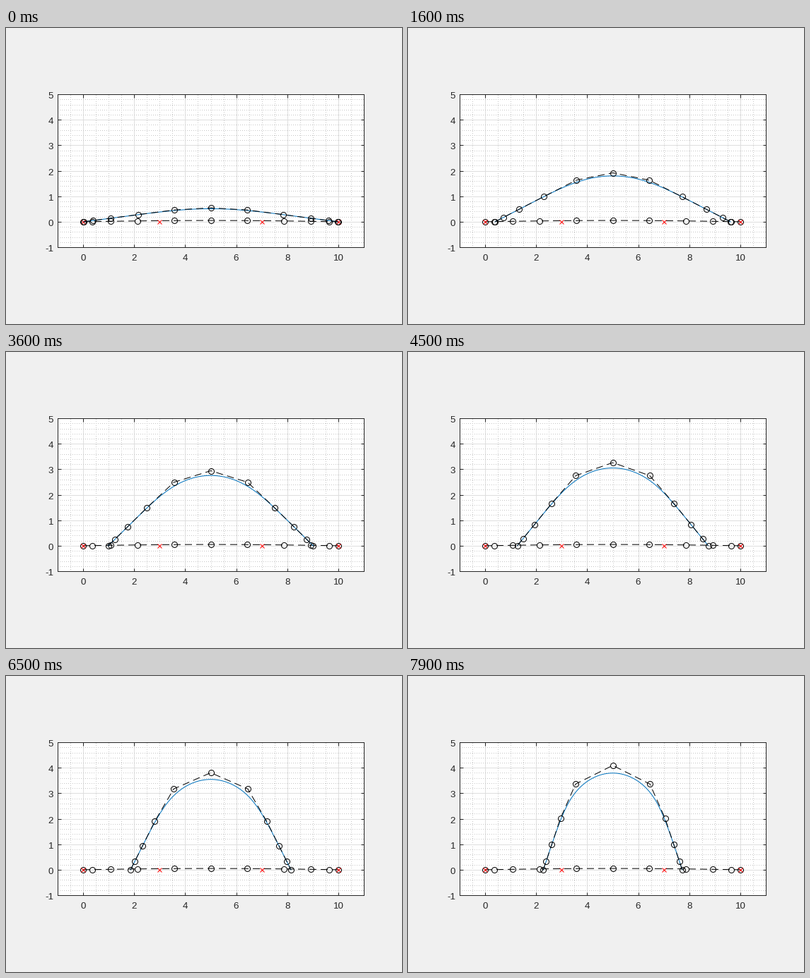
A matplotlib script for the animation above (8 s loop, 560 by 420 pixels).

```python
import numpy as np
import matplotlib.pyplot as plt
from matplotlib.animation import FuncAnimation

W, H, DPI = 560, 420, 100
PX = 72 / DPI  # points per pixel
DEG, SPANS = 4, 7
INK = "#262626"

plt.rcParams["font.family"] = "Liberation Sans"

knots = np.r_[[0] * DEG, np.arange(SPANS + 1), [SPANS] * DEG].astype(float)
rest_x = 10 / SPANS * np.array([knots[i + 1:i + DEG + 1].mean()
                                for i in range(SPANS + DEG)])


def basis(t):
    """B-spline basis values, one column per control point."""
    n = len(knots) - 1
    b = np.array([(knots[i] <= t) & (t < knots[i + 1]) for i in range(n)], float)
    for d in range(1, DEG + 1):
        nxt = np.zeros((n - d, len(t)))
        for i in range(n - d):
            left, right = knots[i + d] - knots[i], knots[i + d + 1] - knots[i + 1]
            if left:
                nxt[i] += (t - knots[i]) / left * b[i]
            if right:
                nxt[i] += (knots[i + d + 1] - t) / right * b[i + 1]
        b = nxt
    return b.T


B = basis(np.linspace(0, SPANS - 1e-9, 200))


def mirror(half):
    """Complete the left half (with its apex) symmetrically about x = 5."""
    right = half[-2::-1].copy()
    right[:, 0] = 10 - right[:, 0]
    return np.vstack([half, right])


def arch(step):
    """Control polygon after the ends have been pushed in."""
    s = 0.06 * (step + 1)
    r = np.sqrt(s)
    p0 = np.array([s / 2, 0])
    p3 = np.array([2.143 + 0.186 * s - 0.002 * s**2,
                   r * (1.138 - 0.034 * s - 0.002 * s**2)])
    p4 = [3.571 - 0.006 * s, r * (1.885 - 0.05 * s - 0.004 * s**2)]
    p5 = [5, r * (2.224 - 0.0675 * s)]
    p1, p2 = p0 + (p3 - p0) / 6, p0 + (p3 - p0) / 2
    return mirror(np.array([p0, p1, p2, p3, p4, p5]))


fig = plt.figure(figsize=(W / DPI, H / DPI), dpi=DPI, facecolor="#f0f0f0")
ax = fig.add_axes([72.9 / W, 108.95 / H, 433.3 / W, 217 / H])
ax.set(xlim=(-1, 11), ylim=(-1, 5))
ax.set_axisbelow(True)
ax.set_xticks(range(0, 11, 2))
ax.set_yticks(range(-1, 6))
ax.set_xticks(np.arange(-0.5, 11, 0.5), minor=True)
ax.set_yticks(np.arange(-0.8, 5, 0.2), minor=True)
ax.tick_params(which="major", direction="in", length=4.5 * PX, width=PX,
               color=INK, top=True, right=True,
               labelbottom=False, labelleft=False)
ax.tick_params(which="minor", length=0)
# half-unit phase puts every dot on a whole pixel
ax.grid(which="minor", color="#c6c6c6", lw=PX, ls=(0.5, (1, 2)),
        dash_capstyle="butt")
ax.grid(which="major", color="#dedede", lw=PX)
for side in ax.spines.values():
    side.set(color=INK, linewidth=PX)


def label(text, x, y, dx, dy, ha):
    ax.annotate(text, (x, y), (dx * PX, dy * PX), textcoords="offset points",
                ha=ha, va="baseline", color=INK, fontsize=13.33 * PX,
                annotation_clip=False)


for v in range(0, 11, 2):
    label(str(v), v, -1, -0.2, -18.7, "center")
for v in range(-1, 6):
    label(str(v), -1, v, -5.9, -6, "right")

dashed = dict(color="k", lw=PX, ls=(0, (10, 6)), dash_capstyle="butt",
              clip_on=False)
rings = dict(color="k", ls="none", marker="o", ms=8 * PX, mfc="none",
             mew=PX, clip_on=False)

rest_y = 0.05 * np.sin(np.pi * rest_x / 10)
ax.plot(rest_x, rest_y, **dashed)
ax.plot(rest_x, rest_y, **rings)
ax.plot([0, 3, 7, 10], [0] * 4, color="r", ls="none", marker="x",
        ms=5.6 * PX, mew=PX)
curve, = ax.plot([], [], color="#0072bd", lw=PX)
poly, = ax.plot([], [], **dashed)
nodes, = ax.plot([], [], **rings)


def draw(frame):
    pts = arch(max(0, frame - 4))
    curve.set_data(*(B @ pts).T)
    poly.set_data(*pts.T)
    nodes.set_data(*pts.T)
    return curve, poly, nodes


anim = FuncAnimation(fig, draw, frames=80, interval=100, repeat=True,
                     repeat_delay=0, blit=False)
plt.show()
```
